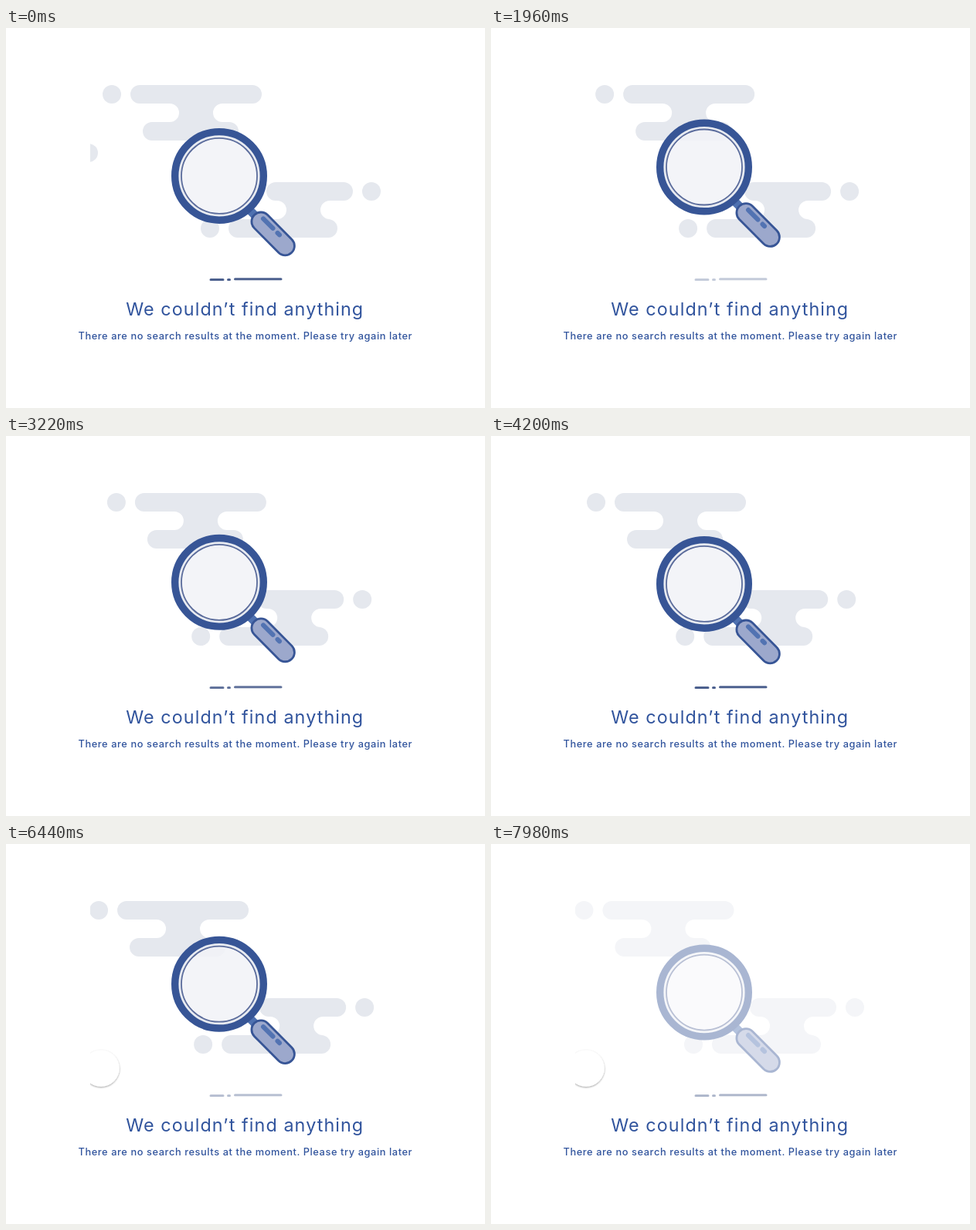
Animation, 620 px wide and 493 px high, one loop 8 s. Source, as an HTML page:

```html
<!DOCTYPE html>
<html lang="en">
<head>
<meta charset="utf-8">
<title>No search results</title>
<style>
  html, body { margin: 0; width: 100%; height: 100%; overflow: hidden; background: #fff; }
  svg { display: block; }
  text { font-family: Inter, "Open Sans", sans-serif; font-optical-sizing: none; fill: #31549d; text-anchor: middle; }
  .title { font-size: 23.3px; letter-spacing: 1.1px; }
  .note { font-size: 12.8px; font-weight: 500; letter-spacing: .59px; }
  .cloud { fill: #e5e8ee; }
  .line { fill: none; stroke-linecap: round; }
</style>
</head>
<body>
<svg width="620" height="493" viewBox="0 0 620 493">
  <defs>
    <clipPath id="panel"><rect x="109" width="511" height="493"/></clipPath>
    <path id="neck" d="M0 0a12 12 0 0 1 0 24H68a12 12 0 0 1 0-24z"/>
    <filter id="soft" x="-20%" y="-20%" width="140%" height="140%">
      <feDropShadow dx="0" dy="1" stdDeviation="1" flood-color="#000" flood-opacity=".4"/>
    </filter>
  </defs>

  <g id="scene">
    <g class="cloud" clip-path="url(#panel)">
      <g id="topCloud">
        <circle cx="137" cy="86" r="12"/>
        <rect x="161" y="74" width="170" height="24" rx="12"/>
        <use href="#neck" x="212" y="98"/>
        <rect x="177" y="122" width="124" height="24" rx="12"/>
      </g>
      <g id="lowCloud">
        <circle cx="473" cy="212" r="12"/>
        <rect x="337" y="200" width="112" height="24" rx="12"/>
        <use href="#neck" x="351" y="224"/>
        <rect x="288" y="248" width="141" height="24" rx="12"/>
        <circle cx="264" cy="260" r="12"/>
      </g>
      <circle id="dot" cy="162" r="12"/>
    </g>

    <path id="ground" class="line" stroke="#455a8a" stroke-width="3" d="M265 326.5h16M287.5 326.5h2M296.5 325.8h59.5"/>

    <!-- Drawn around the centre of the lens -->
    <g id="glass">
      <path class="line" stroke="#4f71b0" stroke-width="11" d="M36 41L50 55"/>
      <circle r="53" fill="#f2f3f7" opacity=".87"/>
      <circle r="51" fill="none" stroke="#e8ebf1" stroke-width="4"/>
      <circle r="49" fill="none" stroke="#5b6c9c" stroke-width="1.8"/>
      <circle r="57.3" fill="none" stroke="#375596" stroke-width="9.4"/>
      <path class="line" stroke="#375596" stroke-width="27" d="M54 59.2L85.3 90.8"/>
      <path class="line" stroke="#9ca8cc" stroke-width="21.4" d="M54 59.2L85.3 90.8"/>
      <path class="line" stroke="#5273b2" stroke-width="6" d="M57 55.5L69.5 68M75.5 74L78 76.5"/>
    </g>
  </g>

  <g clip-path="url(#panel)">
    <circle id="button" r="23.8" fill="#fff" filter="url(#soft)"/>
  </g>

  <text class="title" x="309.2" y="373">We couldn’t find anything</text>
  <text class="note" x="309.8" y="404">There are no search results at the moment. Please try again later</text>
</svg>

<script>
const LOOP = 8000;
const el = id => document.getElementById(id);
const scene = el('scene'), topCloud = el('topCloud'), lowCloud = el('lowCloud'),
      dot = el('dot'), ground = el('ground'), glass = el('glass'), button = el('button');

const progress = (t, from, to) => Math.min(1, Math.max(0, (t - from) / (to - from)));
const easeOut = u => 1 - (1 - u) ** 2;
const move = (node, x, y) => node.setAttribute('transform', `translate(${x} ${y})`);

function topShift(t) {
  if (t < 1800) return 10.2 * easeOut(t / 1800);
  const fall = -4.6 + 14.8 * Math.cos(Math.PI * (Math.min(t, 7350) - 1800) / 5700);
  return fall + 2.8 * progress(t, 7350, 7980) ** 2;
}

function lowShift(t) {
  return t < 5060
    ? -13 + 13 * (1 - t / 5060) ** 2.35
    : -13 + 11.5 * Math.sin(Math.PI / 2 * progress(t, 5060, 8430)) ** 2;
}

function draw(t) {
  move(topCloud, topShift(t), 0);
  move(lowCloud, lowShift(t), 0);
  dot.setAttribute('cx', 107 - 10.5 * progress(t, 0, 1500));

  const lift = Math.sin(Math.PI * (t + 320) / 4200) ** 2;
  move(glass, 276, 192.6 - 12.3 * lift);
  ground.setAttribute('opacity', 1 - 0.7 * lift);

  const rise = easeOut(progress(t, 5250, 5900));
  move(button, 127.3 - 4.3 * rise, 402 - 111 * rise);
  button.setAttribute('visibility', t < 5250 ? 'hidden' : 'visible');

  scene.setAttribute('opacity', 1 - 0.57 * progress(t, 7840, 7980));
}

const start = performance.now();
function tick() {
  draw((performance.now() - start) % LOOP);
  requestAnimationFrame(tick);
}
tick();
</script>
</body>
</html>
```
